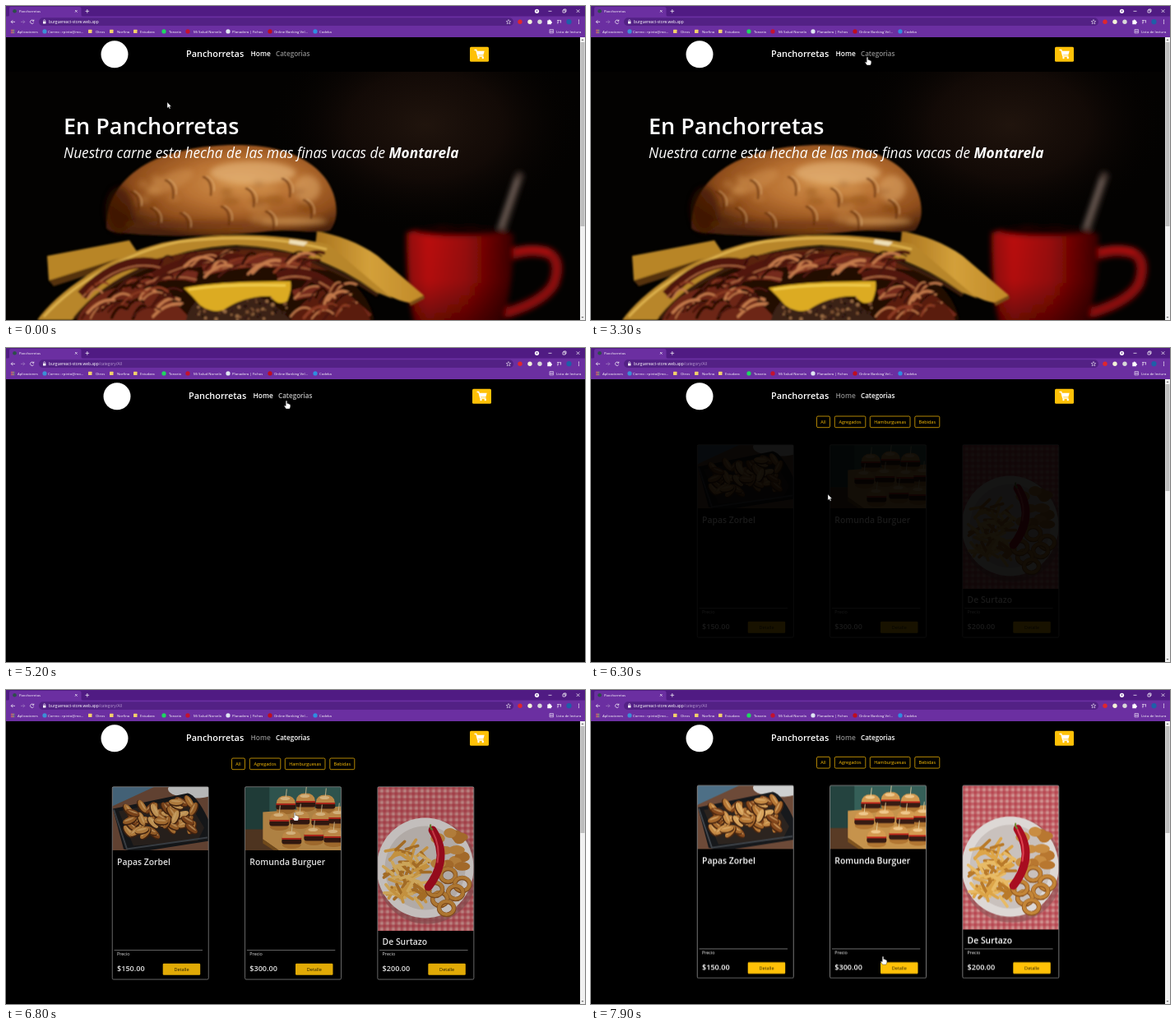
Animation, 704 px wide and 382 px high, one loop 8 s. Source, as an HTML page:

```html
<!DOCTYPE html>
<html lang="es">
<head>
<meta charset="utf-8">
<title>Panchorretas</title>
<style>
html, body { margin: 0; width: 100%; height: 100%; overflow: hidden; background: #000; }
svg { display: block; width: 704px; height: 382px; font-family: "Open Sans", "Noto Sans", sans-serif; }
text { white-space: pre; }
</style>
</head>
<body>
<svg id="stage" viewBox="0 0 704 382" xmlns="http://www.w3.org/2000/svg"></svg>
<script>
const LOOP = 8000, STEP = 100;
const LEAVE = 5100, ACTIVE = 5300, LOADED = 6200, NUDGE = 7200;
const YELLOW = '#ffc107';

let seed = 7;
const rnd = (a = 0, b = 1) => {
  seed = (seed * 16807) % 2147483647;
  return a + (b - a) * seed / 2147483647;
};
const repeat = (n, fn) => Array.from({ length: n }, (_, i) => fn(i)).join('');
const text = (x, y, s, size, fill = '#fff', more = '') =>
  `<text x="${x}" y="${y}" font-size="${size}" fill="${fill}" ${more}>${s}</text>`;
const rect = (x, y, w, h, fill, more = '') =>
  `<rect x="${x}" y="${y}" width="${w}" height="${h}" fill="${fill}" ${more}/>`;
const oval = (x, y, rx, ry, fill, more = '') =>
  `<ellipse cx="${x}" cy="${y}" rx="${rx}" ry="${ry}" fill="${fill}" ${more}/>`;
const dot = (x, y, r, fill, more = '') => oval(x, y, r, r, fill, more);
const path = (d, fill, more = '') => `<path d="${d}" fill="${fill}" ${more}/>`;
const line = (d, stroke, w = 0.7, more = '') =>
  path(d, 'none', `stroke="${stroke}" stroke-width="${w}" ${more}`);
const group = (id, body, more = '') => `<g id="${id}" ${more}>${body}</g>`;
const MID = 'text-anchor="middle"', BOLD = 'font-weight="600"', ROUND = 'stroke-linecap="round"';

const stops = (...list) => list.map(([o, c, a = 1]) =>
  `<stop offset="${o}" stop-color="${c}" stop-opacity="${a}"/>`).join('');
const defs = `<defs>
  <radialGradient id="glow">${stops([0, '#20140d'], [0.5, '#140b07', 0.9], [1, '#040201', 0])}</radialGradient>
  <radialGradient id="bun" cx=".58" cy=".42" r=".62">${stops([0, '#d3924c'], [0.4, '#b97233'], [0.75, '#8f4d1b'], [1, '#4a220a'])}</radialGradient>
  <linearGradient id="slice" x1="0" x2="1">${stops([0, '#a9741f'], [0.5, '#d3a03a'], [1, '#c18a28'])}</linearGradient>
  <linearGradient id="mug" x1="0" x2="1">${stops([0, '#8d0706'], [0.2, '#bb0d0b'], [0.55, '#980908'], [0.85, '#5a0404'], [1, '#380202'])}</linearGradient>
  <linearGradient id="dusk" x1="0" x2="0" y1="0" y2="1">${stops([0, '#000', 0], [0.5, '#000', 0.05], [1, '#000', 0.5])}</linearGradient>
  <filter id="soft1" x="-20%" y="-20%" width="140%" height="140%"><feGaussianBlur stdDeviation=".8"/></filter>
  <filter id="soft3" x="-30%" y="-30%" width="160%" height="160%"><feGaussianBlur stdDeviation="3"/></filter>
  <pattern id="cloth" width="7" height="7" patternUnits="userSpaceOnUse">
    ${rect(0, 0, 7, 7, '#d0918f')}${rect(0, 0, 3.5, 7, '#b02f3d', 'opacity=".5"')}${rect(0, 0, 7, 3.5, '#b02f3d', 'opacity=".5"')}
  </pattern>
  <clipPath id="page">${rect(0, 80, 698, 302, '#000')}</clipPath>
  <clipPath id="short">${rect(0.5, 0.5, 116.5, 77, '#000')}</clipPath>
  <clipPath id="tall">${rect(0.5, 0.5, 116.5, 175, '#000')}</clipPath>
</defs>`;

// Browser window
function browser() {
  const folder = '#f2d06b';
  const marks = [
    [51, 'Correo : rpinto@mo...', '#3c8fd6', 47], [109, 'Otros', folder, 102],
    [135, 'Norfina', folder, 128], [163, 'Estudara', folder, 157],
    [198, 'Tonaria', '#1ed760', 192], [228, 'Mi Salud Norvela', '#c4122f', 221],
    [275, 'Planadera | Fichos', '#dfe6f2', 270], [326, 'Online Banking Vel...', '#c00d1e', 321],
    [381, 'Codeka', '#2f8de0', 376]
  ];
  const extras = [[625, '#e0262d'], [637, '#f3f3d8'], [649, '#d8d8d8']];
  return rect(0, 0, 704, 13, '#501b83') + rect(0, 12.5, 704, 25.5, '#6b2fa1') +
    path('M2 13Q4 13 4 11V3Q4 1 6 1H89Q91.5 1 91.5 3V11Q91.5 13 94 13Z', '#6b2fa1') +
    dot(10.5, 6.3, 2.3, '#2c4f4a') + text(16, 8, 'Panchorretas', 4.2) +
    line('M84 5l2.6 2.6m0-2.6l-2.6 2.6M96.500 6.300h4.600m-2.300-2.300v4.600', '#fff') +
    dot(645.5, 6.3, 2.6, '#fff') + path('M644.300 5.600h2.400l-1.200 1.600z', '#501b83') +
    line('M659.500 6.300h4M677 5h3v3h-3zM678 5v-1h3v3h-1M693.700 4.300l3.700 3.700m0-3.700l-3.700 3.700', '#fff') +
    line('M11 19.300H6.200m2-2l-2 2l2 2', '#fff') +
    line('M18 19.300h4.800m-2-2l2 2l-2 2', '#a583c4') +
    line('M33.500 18a2.200 2.200 0 1 0 .2 2.200M33.800 16.600v1.700h-1.700', '#fff') +
    rect(40, 14.3, 577, 9.8, '#532185', 'rx="4.9"') +
    rect(45, 18.7, 3.4, 2.8, '#fff') + line('M45.700 18.700v-1a1 1 0 0 1 2 0v1', '#fff', 0.6) +
    `<text x="52" y="21" font-size="4.8" fill="#fff">burguereact-store.web.app<tspan id="route" fill="#b79bd0">/category/All</tspan></text>` +
    line('M611 16.500l.8 1.900 2 .1-1.600 1.300.6 2-1.800-1.100-1.800 1.100.6-2-1.600-1.300 2-.1z', '#fff', 0.5) +
    extras.map(([x, c]) => dot(x, 19.2, 2.7, c)).join('') +
    path('M658.300 17.500h1.400a1 1 0 0 1 2 0h1.300v1.500a1 1 0 0 1 0 2v1.300h-4.700z', '#fff') +
    line('M670 17.500h3.500m-3.500 1.700h2.500m-2.500 1.700h1.700M674.500 17v3.500', '#fff') +
    dot(684.5, 19.2, 3.1, '#1f5fa8') + repeat(3, i => dot(696.5, 17.2 + i * 2, 0.6, '#fff')) +
    repeat(9, i => rect(6 + (i % 3) * 1.7, 28.7 + Math.floor(i / 3) * 1.7, 1.1, 1.1, ['#ea6a5a', '#f0c04c', '#6ab36a'][i % 3])) +
    text(14, 32.5, 'Aplicaciones', 4.3) +
    marks.map(([x, s, c, ix]) =>
      (c === folder ? rect(ix - 2, 28.7, 4.5, 4.2, c, 'rx=".5"') : dot(ix, 30.9, 2.6, c)) +
      text(x, 32.5, s, 4.3)).join('') +
    line('M661 28.500h4.500v4.500h-4.500zM661 30h4.500M661 31.500h4.500', '#e6d8f2', 0.6) +
    text(669, 32.5, 'Lista de lectura', 4.3);
}

function navbar() {
  const cart = line('M569.500 53.500h2.300l2 7.500h6.700', '#fff', 1.3) +
    path('M572 54.800h9.700l-1.300 4.800h-7.200z', '#fff') + dot(574.5, 63, 1.2, '#fff') + dot(579.8, 63, 1.2, '#fff');
  return rect(-4, 38, 708, 42, '#000') + dot(132, 58.8, 16.5, '#fff') +
    text(219, 62, 'Panchorretas', 10.9, '#fff', BOLD) +
    text(297.5, 61, 'Home', 8.4, '#fff', 'id="homeLink" ' + BOLD) +
    text(328, 61, 'Categorias', 8.1, '#8c8c8c', 'id="catLink" ' + BOLD) +
    rect(564, 49.8, 23, 18, YELLOW, 'rx="1.5"') + cart;
}

// Landing page photo, back to front
function mug() {
  return line('M624 207L602 274', '#42342f', 11, ROUND) + line('M621 212L601 268', '#74655d', 4, ROUND) +
    line('M612 303Q640 294 660 301Q676 310 666 338Q654 360 606 374', '#8b0808', 13) +
    line('M612 299Q640 290 662 299', '#c01512', 4) +
    path('M487 276Q486 345 498 392H602Q618 340 617 278Q600 268 550 268Q505 268 487 276Z', 'url(#mug)') +
    path('M487 276Q486 345 498 392H602Q618 340 617 278Z', 'url(#dusk)') +
    oval(550, 274, 52, 6, '#160303');
}

function fillings() {
  const bacon = [[92, 352, 190, 316], [120, 368, 232, 330], [180, 330, 300, 312], [240, 322, 370, 318], [330, 330, 412, 356], [350, 352, 440, 380]];
  const crumbs = ['#7b4f30', '#1f0e07', '#9a6c44', '#3b2013'];
  const ham = (x, y, reach) => line(`M${x} ${y}q${reach / 2}-18 ${reach}-${rnd(6, 16)}`,
    ['#2a0c06', '#8b3a22', '#4b160c', '#c47a4c'][Math.floor(rnd(0, 4))], rnd(1.5, 4), ROUND);
  return path('M70 382Q90 330 180 312Q300 292 400 320Q440 345 448 382Z', '#200a05') +
    path('M50 304L150 285L160 300L110 322L52 334Z', '#b88526') +
    path('M52 334L150 303L156 309L58 341Z', '#54320c') +
    path('M378 274C402 278 430 288 452 304L508 352Q506 358 490 361C460 356 420 325 376 292Z', 'url(#slice)') +
    path('M490 361L508 352L509 356L492 365Z', '#7c4b12') +
    path('M38 382C62 348 120 306 190 288C260 274 330 276 392 290L470 356L450 348C400 312 350 294 280 291C200 294 130 325 80 382Z', '#b8862b') +
    line('M46 378C84 336 146 300 210 287C280 278 340 283 390 296', '#e0b54f', 2.5) +
    line('M84 380C126 328 200 297 285 295C350 297 400 318 452 352', '#3a1d07', 5) +
    path('M180 308Q250 290 345 300L392 322Q300 308 190 322Z', '#5a230f') +
    bacon.map(([x, y, u, v], i) => {
      const cx = (x + u) / 2, top = Math.min(y, v);
      return line(`M${x} ${y}Q${cx} ${top - 16} ${u} ${v}`, i % 2 ? '#74291a' : '#511409', 13) +
        line(`M${x} ${y + 3}Q${cx} ${top - 12} ${u} ${v + 3}`, '#b06a43', 1.8);
    }).join('') +
    path('M86 384Q100 346 150 340Q200 346 226 384Z', '#6d2815') +
    path('M345 384Q360 352 400 342Q432 356 444 384Z', '#5a1f10') +
    repeat(34, () => ham(rnd(92, 190), rnd(336, 384), rnd(14, 36))) +
    repeat(26, () => ham(rnd(180, 360), rnd(312, 332), rnd(14, 40))) +
    repeat(22, () => ham(rnd(346, 410), rnd(346, 384), rnd(12, 30))) +
    path('M218 390Q220 354 260 346Q320 344 352 390Z', '#3b2015') +
    repeat(90, () => dot(rnd(228, 343), rnd(354, 382), rnd(0.8, 2.4), crumbs[Math.floor(rnd(0, 4))])) +
    path('M216 343Q260 334 346 335Q348 344 342 359Q330 366 322 353Q290 352 264 370Q250 374 236 364Q226 352 216 343Z', '#dcab22') +
    line('M222 345Q270 338 340 340', '#f3d050', 2.5) +
    path('M345 284l22 3l-5 5l-18-3z', '#efe0b8');
}

function topBun() {
  const shape = 'M122 270C121 242 136 214 164 196C200 173 262 165 312 171C356 177 388 198 398 228C404 246 403 262 394 273C372 278 350 271 320 274C260 281 190 281 150 277C134 276 125 275 122 270Z';
  const dents = [[152, 226], [176, 246], [194, 212], [212, 252], [240, 208], [262, 244], [292, 222], [316, 250], [336, 210], [362, 236]];
  return path(shape, 'url(#bun)') +
    group('shade', oval(138, 248, 17, 28, '#3d1a07', 'opacity=".6"') + oval(300, 203, 52, 14, '#e9bb80', 'opacity=".6"') +
      oval(200, 214, 30, 10, '#cf9150', 'opacity=".5" transform="rotate(-24 200 214)"') +
      oval(366, 222, 16, 16, '#e3ad6e', 'opacity=".5"') + oval(240, 266, 95, 5, '#6a3511', 'opacity=".5"') +
      oval(350, 262, 40, 5, '#dba660', 'opacity=".6"') +
      repeat(16, i => oval(rnd(165, 375), rnd(205, 260), rnd(6, 14), rnd(3, 7), i % 2 ? '#73390f' : '#dc9f58', 'opacity=".3"')),
      'filter="url(#soft3)"') +
    dents.map(([x, y]) => line(`M${x} ${y}q11 4 9 22`, '#5d2b0c', 2.6, `opacity=".6" ${ROUND}`) +
      line(`M${x + 4} ${y - 1}q11 6 9 18`, '#ecc38c', 1.4, `opacity=".5" ${ROUND}`)).join('');
}

function hero() {
  return rect(0, 80, 698, 302, '#030201') + oval(510, 145, 190, 130, 'url(#glow)') +
    group('cup', mug(), 'filter="url(#soft3)"') +
    group('burger', fillings() + topBun(), 'filter="url(#soft1)"') +
    text(70, 156, 'En Panchorretas', 27, '#fff', BOLD) +
    `<text x="70" y="185" font-size="17.3" fill="#fff" font-style="italic">Nuestra carne esta hecha de las mas finas vacas de <tspan font-weight="700">Montarela</tspan></text>`;
}

// Food photos, drawn from the card's top left corner
function wedges() {
  const tones = ['#c58a45', '#a5672c', '#d6a25c', '#86491d', '#b67735'];
  return rect(0, 0, 118, 78, '#6d4a38') + path('M0 0H52L0 24Z', '#4d6f86') + oval(100, 3, 32, 11, '#cfd0d0') +
    path('M1 27L92 8Q103 10 118 42V66L30 80L14 76Z', '#17191c') + path('M8 30L90 14L112 50L104 66L26 72Z', '#2c241f') +
    repeat(50, i => {
      const x = rnd(17, 100), y = rnd(25, 62) - x * 0.08;
      return `<g transform="translate(${x} ${y}) rotate(${rnd(-70, 70)})">${oval(0, 1, 9, 4.4, '#4a2711')}${oval(0, 0, 8.5, 3.7, tones[i % 5])}${oval(0, -1, 6, 1, '#e7bd7d', 'opacity=".6"')}</g>`;
    }) + line('M2 28L18 76L116 62', '#3f444a', 2);
}

function sliders() {
  const spots = [[50, 18], [74, 15], [98, 17], [42, 38], [67, 36], [93, 37], [114, 35], [57, 60], [84, 56], [108, 58]];
  return rect(0, 0, 118, 78, '#355f58') + rect(0, 0, 30, 78, '#24433f') + rect(0, 52, 118, 26, '#593b25') +
    path('M22 31L118 24V78H42L22 64Z', '#c6934c') + path('M22 64L42 78H36L22 69Z', '#80541f') +
    spots.map(([x, y]) => oval(x, y + 11, 11.5, 4.5, '#b27632') + rect(x - 12, y + 3, 24, 7, '#371b12', 'rx="3"') +
      rect(x - 12, y + 2, 24, 2.6, '#bd2a1d', 'rx="1"') +
      path(`M${x - 11.5} ${y + 2.5}Q${x - 11} ${y - 7} ${x} ${y - 7}Q${x + 11} ${y - 7} ${x + 11.5} ${y + 2.5}Z`, '#d49a50') +
      oval(x - 1, y - 3.5, 6, 2, '#efc88c') + line(`M${x} ${y - 5}l1-10`, '#e2cfa0', 0.9)).join('');
}

function platter() {
  const rings = [[86, 108], [103, 119], [95, 129], [76, 137], [84, 148], [70, 125]];
  return rect(0, 0, 118, 176, 'url(#cloth)') + oval(60, 103, 62, 64, '#8e5558', 'opacity=".6"') +
    oval(58, 99, 59, 61, '#ddd8d5') + oval(58, 99, 49, 51, '#c9c1bd') +
    repeat(13, i => oval(rnd(72, 105), rnd(55, 98), rnd(7, 10), rnd(5, 7), i % 2 ? '#b87730' : '#c98d42')) +
    repeat(85, i => {
      const x = rnd(7, 54), y = rnd(76, 138), a = rnd(-1.3, 1.3);
      return line(`M${x} ${y}l${15 * Math.cos(a)} ${15 * Math.sin(a)}`, ['#dda548', '#b97a2a', '#e8bb66'][i % 3], 3.6, ROUND);
    }) +
    rings.map(([x, y]) => oval(x, y, 9, 8, 'none', 'stroke="#8f5520" stroke-width="5.5"') +
      oval(x, y - 0.5, 9, 8, 'none', 'stroke="#c48638" stroke-width="4"')).join('') +
    line('M67 53Q80 73 76 93Q73 108 62 122', '#a80d20', 10, ROUND) +
    line('M67 54Q77 74 73 92', '#de4150', 2, ROUND) +
    line('M67 53Q63 49 65 46', '#6f8c35', 2);
}

function card(i, name, price, photo, tall) {
  return `<g transform="translate(${129 + i * 161.3} 117.5)">` +
    `<g clip-path="url(#${tall ? 'tall' : 'short'})">${photo}</g>` +
    rect(0.25, 0.25, 117, 234.3, 'none', 'rx="1.5" stroke="#a9a9a9" stroke-width=".7"') +
    text(6, tall ? 192.5 : 95, name, 10.4, '#fff', BOLD) +
    line('M2.500 199H110', '#9c9c9c') + text(6, 205.5, 'Precio', 5.4) +
    text(6, 224, price, 9.1, '#fff', BOLD) + rect(61.7, 215.3, 45.5, 14, YELLOW, 'rx="1.2"') +
    text(84.5, 224.2, 'Detalle', 5.5, '#2a2205', MID) + '</g>';
}

function shop() {
  const filters = [[274.5, 16, 'All'], [296.3, 37.5, 'Agregados'], [339.3, 48.7, 'Hamburguesas'], [393.8, 30, 'Bebidas']];
  return filters.map(([x, w, s]) =>
    rect(x, 83, w, 13.7, 'none', `rx="1.5" stroke="${YELLOW}" stroke-width=".7"`) +
    text(x + w / 2, 91.8, s, 5.5, YELLOW, MID)).join('') +
    group('cards', card(0, 'Papas Zorbel', '$150.00', wedges()) +
      card(1, 'Romunda Burguer', '$300.00', sliders()) +
      card(2, 'De Surtazo', '$200.00', platter(), true));
}

const scrollbar = rect(698, 38, 6, 344, '#f1f1f1') + rect(698.5, 44, 5, 224, '#bdbdbd', 'id="thumb"') +
  path('M699.500 42l1.500-1.800 1.500 1.800zM699.500 378l1.500 1.800 1.500-1.800z', '#666');
const OUTLINE = 'stroke="#222" stroke-width=".4"';
const arrow = path('M0 0V7.200L1.700 5.700L2.800 8.200L4 7.700L2.900 5.300H5Z', '#fff', OUTLINE);
const hand = path('M-.8 .5Q0-.4 .8 .5V3.500Q2 3 2.300 3.900Q3.400 3.600 3.600 4.500Q4.800 4.400 4.800 5.400V7.500L3.900 10H-.5L-2.800 6.600Q-2.600 5.300-.8 6.500Z', '#fff', OUTLINE);

const stage = document.getElementById('stage');
stage.innerHTML = defs + rect(0, 0, 704, 382, '#000') +
  group('home', hero(), 'clip-path="url(#page)"') + group('shop', shop()) +
  group('nav', navbar()) + group('bar', scrollbar) + browser() +
  group('mouse', group('arrow', arrow) + group('hand', hand));

const el = id => document.getElementById(id);
const show = (id, on) => { el(id).style.display = on ? '' : 'none'; };
const place = (id, x, y) => el(id).setAttribute('transform', `translate(${x} ${y})`);

// Time, x, y of the pointer
const trail = [
  [0, 196, 117], [1500, 215, 247], [2000, 226, 240], [3200, 336, 62], [3300, 336, 62],
  [5200, 341, 64], [6200, 288, 178], [6300, 288, 178], [6800, 351, 149], [7900, 355, 324], [8000, 355, 324]
];
const timed = [
  el('mouse').animate(trail.map(([t, x, y]) => ({
    offset: t / LOOP, transform: `translate(${x}px, ${y}px)`, easing: 'ease-in-out'
  })), { duration: LOOP, fill: 'both' }),
  el('cards').animate([{ opacity: 0 }, { opacity: 1 }],
    { delay: LOADED, duration: 1000, easing: 'ease', fill: 'both' })
];
timed.forEach(a => a.pause());

function draw(t) {
  const loading = t >= LEAVE && t < LOADED;
  const pointing = (t >= 3200 && t < 5400) || t >= 6400;
  timed.forEach(a => { a.currentTime = t; });
  show('home', t < LEAVE);
  show('shop', t >= LOADED);
  show('bar', !loading);
  show('route', t >= LEAVE);
  show('hand', pointing);
  show('arrow', !pointing);
  place('nav', loading ? 3 : 0, 0);
  place('shop', 0, t >= NUDGE ? -1.6 : 0);
  el('thumb').setAttribute('height', t < LEAVE ? 224 : 130);
  el('homeLink').setAttribute('fill', t < ACTIVE ? '#fff' : '#8c8c8c');
  el('catLink').setAttribute('fill', t >= ACTIVE ? '#fff' : t > 3300 ? '#bfbfbf' : '#8c8c8c');
}

function tick() {
  const t = performance.now() % LOOP;
  draw(Math.floor(t / STEP) * STEP);
  requestAnimationFrame(tick);
}
tick();
</script>
</body>
</html>
```
